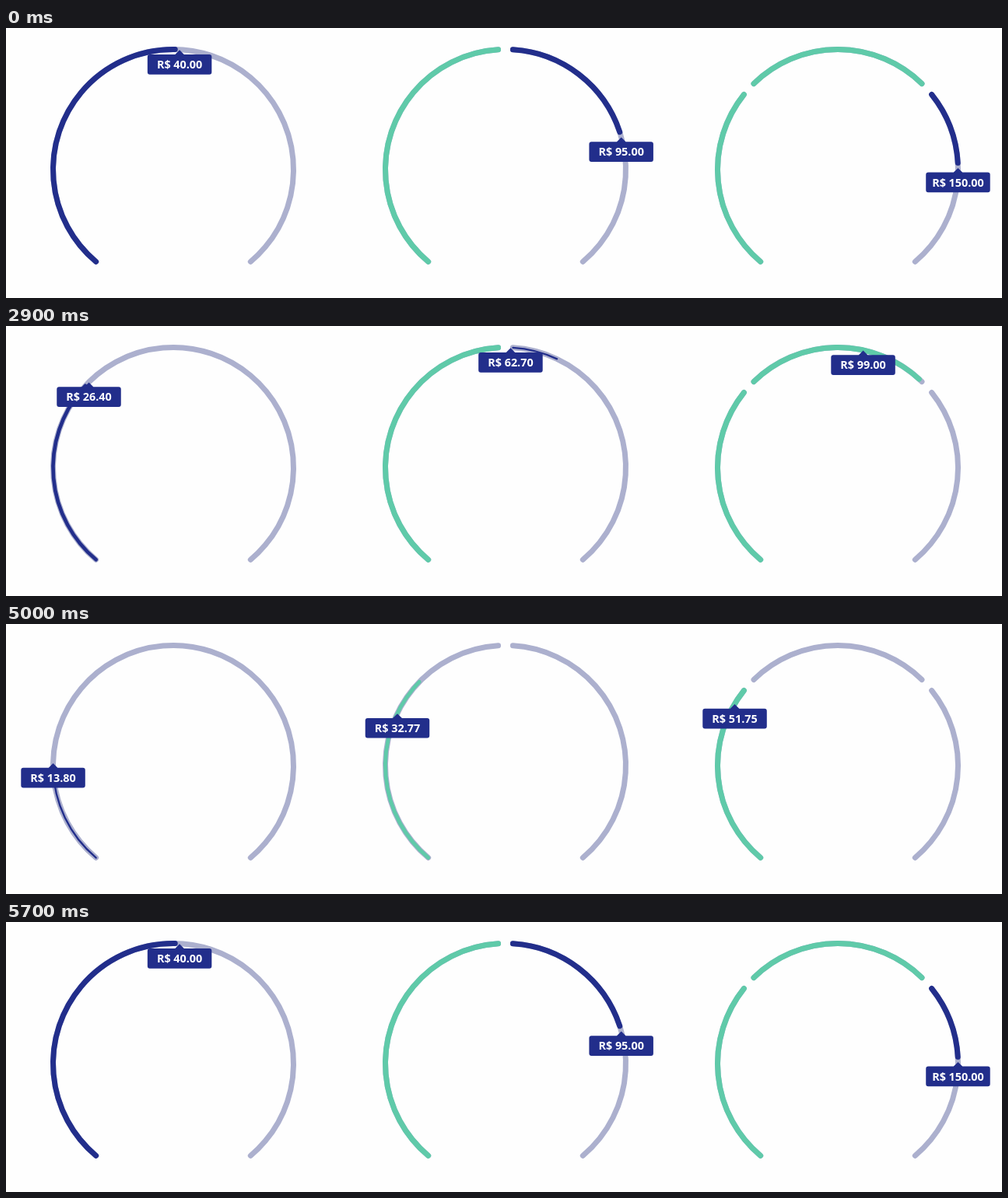
Animation, 1280 px wide and 347 px high, one loop 10000 ms. Source, as an HTML page with a canvas:

```html
<!DOCTYPE html>
<html lang="en">
<head>
<meta charset="utf-8">
<title>Segmented gauges</title>
<style>
  html, body { margin: 0; width: 100%; height: 100%; overflow: hidden; background: #fefefe; }
  canvas { display: block; }
</style>
</head>
<body>
<canvas id="stage" width="1280" height="347"></canvas>
<script>
const ctx = document.getElementById('stage').getContext('2d');

const LOOP = 10000, STEP = 100;
const CENTER_Y = 182, RADIUS = 154.5, STROKE = 7;
const START = 130, SWEEP = 280, GAP = 7;
const LABEL_LEAD = 3;
const TRACK = '#acb0ce', BLUE = '#222e8b', GREEN = '#5fcaa9';

// lastFill: share of the final segment that gets filled; travel: label path in degrees
const gauges = [
  { x: 215, segments: 1, value: 40, lastFill: 0.503, travel: 140 },
  { x: 642, segments: 2, value: 95, lastFill: 0.5, travel: 211.2 },
  { x: 1069, segments: 3, value: 150, lastFill: 0.4, travel: 226 }
];

// Each run climbs linearly in steps: first value, then a rate per millisecond.
const runs = [
  { at: 2300, from: 0.028, rate: 0.316 / 300 },
  { at: 4700, from: 0.02, rate: 0.65 / 600 }
];

const clamp = v => Math.min(1, Math.max(0, v));
const rad = deg => deg * Math.PI / 180;

function progressAt(time) {
  const run = runs.find(r => time >= r.at && time < r.at + 1000);
  if (!run) return 1;
  const elapsed = Math.floor((time - run.at) / STEP) * STEP;
  return Math.round(clamp(run.from + run.rate * elapsed) * 1000) / 1000;
}

function arc(x, from, length, width, color) {
  ctx.beginPath();
  ctx.arc(x, CENTER_Y, RADIUS, rad(from), rad(from + length));
  ctx.lineWidth = width;
  ctx.strokeStyle = color;
  ctx.stroke();
}

function drawLabel(x, y, text) {
  ctx.fillStyle = BLUE;
  ctx.beginPath();
  ctx.roundRect(x - 41.25, y + 6.3, 82.5, 25.7, 3);
  ctx.moveTo(x - 6.5, y + 7);
  ctx.lineTo(x, y + 0.6);
  ctx.lineTo(x + 6.5, y + 7);
  ctx.fill();
  ctx.fillStyle = '#fff';
  ctx.fillText(text, x, y + 24.3);
}

function drawGauge({ x, segments, value, lastFill, travel }, progress) {
  const length = (SWEEP - GAP * (segments - 1)) / segments;
  for (let i = 0; i < segments; i++) {
    const from = START + i * (length + GAP);
    const last = i === segments - 1;
    const grow = clamp(progress * segments - i);
    arc(x, from, length, STROKE, TRACK);
    if (grow > 0) {
      arc(x, from, length * grow * (last ? lastFill : 1), STROKE * grow, last ? BLUE : GREEN);
    }
  }
  const angle = rad(START + LABEL_LEAD + travel * progress);
  drawLabel(
    x + RADIUS * Math.cos(angle),
    CENTER_Y + RADIUS * Math.sin(angle),
    'R$ ' + (value * progress).toFixed(2)
  );
}

function draw() {
  const progress = progressAt(performance.now() % LOOP);
  ctx.fillStyle = '#fefefe';
  ctx.fillRect(0, 0, 1280, 347);
  ctx.lineCap = 'round';
  ctx.textAlign = 'center';
  ctx.font = '700 14.4px "Open Sans", sans-serif';
  gauges.forEach(gauge => drawGauge(gauge, progress));
  requestAnimationFrame(draw);
}
draw();
</script>
</body>
</html>
```
